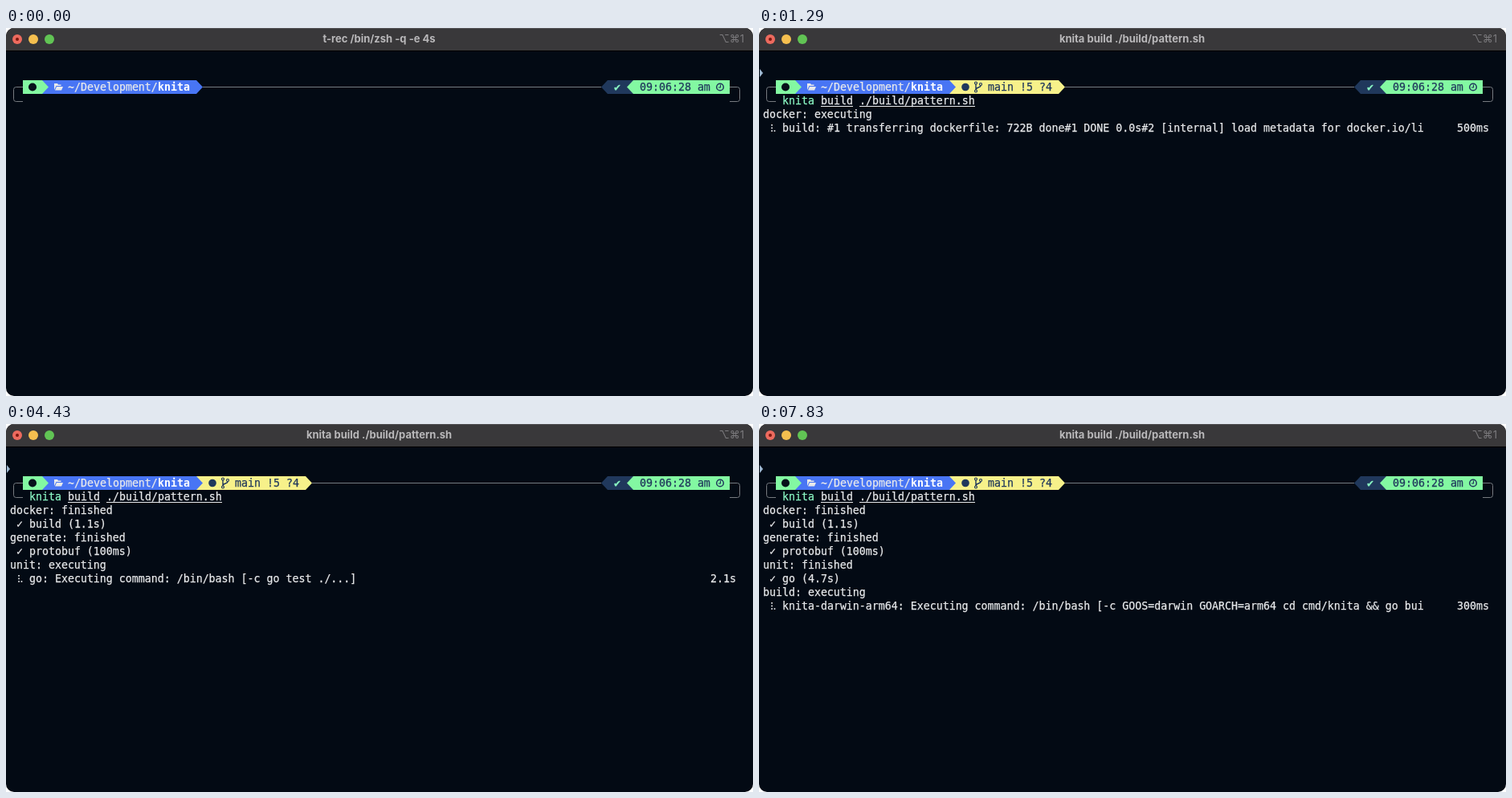
Write an HTML page with a canvas that moves like this. It is 930 px wide and 458 px high and loops after 8 s.

```html
<!DOCTYPE html>
<html lang="en">
<head>
<meta charset="utf-8">
<title>Terminal build</title>
<style>
html, body { margin: 0; width: 100%; height: 100%; overflow: hidden; background: #fff; }
canvas { display: block; width: 930px; height: 458px; }
</style>
</head>
<body>
<canvas id="stage" width="930" height="458"></canvas>
<script>
const ctx = document.getElementById('stage').getContext('2d');
const LOOP = 8000, CELL = 8, LEFT = 5, ROW = 17, TOP = 65;
const MONO = '13.288px "DejaVu Sans Mono", "Liberation Mono", monospace';
const UI = 'Inter, "DejaVu Sans", sans-serif';
const C = {
  bg: '#030a14', bar: '#39383a', text: '#e8e9eb', line: '#777b80',
  green: '#83f8a2', blue: '#4875f4', yellow: '#f7f18a', navy: '#20385c',
  mint: '#8af6c3', ink: '#07101a'
};
// Screen refresh times in ms
const TICKS = [0, 250, 510, 770, 1030, 1290, 1550, 1820, 2080, 2340, 2600, 2860,
  3120, 3390, 3650, 3910, 4170, 4430, 4690, 4950, 5210, 5470, 5750, 6010, 6270,
  6530, 6790, 7050, 7310, 7580, 7830];
// Dot bits 1-3: left column, 4-6: right column
const SPINNER = ['124', '145', '1456', '456', '3456', '356', '236', '1236', '123', '1234'];
const STAGES = [
  { name: 'docker', open: 1030, close: 2080, task: 'build', took: '1.1s', start: 770, phase: 2.2,
    log: '#1 transferring dockerfile: 722B done#1 DONE 0.0s#2 [internal] load metadata for docker.io/li' },
  { name: 'generate', open: 2080, close: 2340, task: 'protobuf', took: '100ms' },
  { name: 'unit', open: 2340, close: 7050, task: 'go', took: '4.7s', start: 2240, phase: 4.8,
    log: 'Executing command: /bin/bash [-c go test ./...]' },
  { name: 'build', open: 7310, close: LOOP, task: 'knita-darwin-arm64', start: 7480, phase: 4,
    log: 'Executing command: /bin/bash [-c GOOS=darwin GOARCH=arm64 cd cmd/knita && go bui' }
];

const cellX = col => LEFT + col * CELL;

function write(str, x, row, color = C.text, bold = false) {
  ctx.font = (bold ? 'bold ' : '') + MONO;
  ctx.fillStyle = ctx.strokeStyle = color;
  ctx.lineWidth = 0.25;
  const y = TOP + row * ROW + 13;
  ctx.fillText(str, x, y);
  if (!bold) ctx.strokeText(str, x, y);
}

function poly(color, ...pts) {
  ctx.fillStyle = color;
  ctx.beginPath();
  for (let i = 0; i < pts.length; i += 2) ctx.lineTo(pts[i], pts[i + 1]);
  ctx.fill();
}

function disc(x, y, r, color) {
  ctx.fillStyle = color;
  ctx.beginPath();
  ctx.arc(x, y, r, 0, Math.PI * 2);
  ctx.fill();
}

function stroke(color, width, path) {
  ctx.strokeStyle = color;
  ctx.lineWidth = width;
  ctx.stroke(new Path2D(path));
}

// Segment with an arrow head; a negative head points left
function segment(x, end, head, color) {
  const mid = TOP + ROW / 2, low = TOP + ROW;
  if (head > 0) poly(color, x, TOP, end, TOP, end + head, mid, end, low, x, low);
  else poly(color, x, TOP, end, TOP, end, low, x, low, x + head, mid);
}

function drawWindow(t) {
  ctx.fillStyle = C.bg;
  ctx.fillRect(0, 0, 930, 458);
  ctx.fillStyle = C.bar;
  ctx.fillRect(0, 0, 930, 28);
  ctx.fillStyle = '#555457';
  ctx.fillRect(0, 0, 930, 1);
  ctx.fillStyle = '#000';
  ctx.fillRect(0, 28, 930, 1);
  disc(14, 14, 6, '#ed6a5e');
  disc(14, 14, 2, '#7d170f');
  disc(34, 14, 6, '#f5bf4f');
  disc(54, 14, 6, '#61c454');

  ctx.textAlign = 'center';
  ctx.font = 'bold 13px ' + UI;
  ctx.fillStyle = '#b9b8ba';
  ctx.fillText(t < 770 ? 't-rec /bin/zsh -q -e 4s' : 'knita build ./build/pattern.sh', 464.5, 18);
  ctx.textAlign = 'right';
  ctx.font = '13px ' + UI;
  ctx.fillStyle = '#7c7b7e';
  ctx.fillText('⌥⌘1', 919, 18);
  ctx.textAlign = 'left';
}

function drawFolder() {
  poly(C.text, 60, 77, 60, 69, 64, 69, 65, 70.5, 68.5, 70.5, 68.5, 72, 62.5, 72);
  poly(C.text, 61, 77.5, 63, 73, 71, 73, 69, 77.5);
}

function drawBranch() {
  stroke(C.navy, 1.4, 'M270 70V77M276 71.5C276 75 270 73 270 77');
  for (const [x, y] of [[270, 68.5], [276, 70], [270, 78.5]]) {
    ctx.beginPath();
    ctx.arc(x, y, 1.5, 0, Math.PI * 2);
    ctx.lineWidth = 1.2;
    ctx.stroke();
  }
}

function drawPrompt(t) {
  const git = t >= 250;
  stroke(C.line, 1, 'M21 73.5H12.5Q9.5 73.5 9.5 76.5V88.5Q9.5 91.5 12.5 91.5H21' +
    'M901 73.5H910.5Q913.5 73.5 913.5 76.5V88.5Q913.5 91.5 910.5 91.5H901');
  stroke(C.line, 1, `M${git ? 381 : 245} 73.5H741`);

  if (git) {
    segment(237, 373, 8, C.yellow);
    disc(257, 73.5, 4.8, C.navy);
    drawBranch();
    write('main !5 ?4', cellX(35), 0, C.navy);
    poly('#9fb9d3', 1, 51, 5, 56, 1, 61);
  }
  segment(45, 237, 8, C.blue);
  segment(21, 45, 8, C.green);
  disc(33, 73.5, 5, C.ink);
  drawFolder();
  write('~', cellX(9), 0, C.text, true);
  write('/Development/', cellX(10), 0);
  write('knita', cellX(23), 0, '#fff', true);

  segment(749, 781, -8, C.navy);
  segment(781, 901, -8, C.green);
  write('✔', cellX(94), 0, C.mint);
  write('09:06:28 am', cellX(98), 0, C.navy);
  ctx.beginPath();
  ctx.arc(889, 73.5, 4.3, 0, Math.PI * 2);
  ctx.lineWidth = 1.5;
  ctx.strokeStyle = C.navy;
  ctx.stroke();
  stroke(C.navy, 1.2, 'M889.5 70.5V74H887');

  if (t >= 510) {
    write('knita', cellX(3), 1, C.mint);
    write('build', cellX(9), 1);
    write('./build/pattern.sh', cellX(15), 1);
    ctx.fillStyle = C.text;
    ctx.fillRect(cellX(9), 97, 5 * CELL, 1);
    ctx.fillRect(cellX(15), 97, 18 * CELL, 1);
  }
}

function drawSpinner(step, row) {
  ctx.fillStyle = C.text;
  for (const bit of SPINNER[step % SPINNER.length]) {
    const n = bit - 1;
    ctx.fillRect(n < 3 ? 15.2 : 18.6, TOP + row * ROW + 4 + (n % 3) * 3.6, 1.7, 1.7);
  }
}

function elapsed(ms) {
  const tenths = Math.floor(ms / 100);
  return tenths < 10 ? tenths * 100 + 'ms' : (tenths / 10).toFixed(1) + 's';
}

function drawStages(t) {
  let row = 2;
  for (const s of STAGES) {
    if (t < s.open) break;
    const done = t >= s.close;
    write(`${s.name}: ${done ? 'finished' : 'executing'}`, LEFT, row++);
    if (done) {
      write(`✓ ${s.task} (${s.took})`, cellX(1), row++);
    } else if (t >= s.start) {
      const age = t - s.start, time = elapsed(age);
      drawSpinner(Math.floor(s.phase + age / 97.5), row);
      write(`${s.task}: ${s.log}`, cellX(3), row);
      write(time, cellX(113 - time.length), row);
    }
  }
}

function render(now) {
  const clock = now % LOOP;
  const t = TICKS.filter(v => v <= clock).pop();
  ctx.clearRect(0, 0, 930, 458);
  ctx.save();
  ctx.beginPath();
  ctx.roundRect(0, 0, 930, 458, 10);
  ctx.clip();
  drawWindow(t);
  drawPrompt(t);
  drawStages(t);
  ctx.restore();
}

const origin = performance.now();
function loop() {
  render(performance.now() - origin);
  requestAnimationFrame(loop);
}
loop();
</script>
</body>
</html>
```
